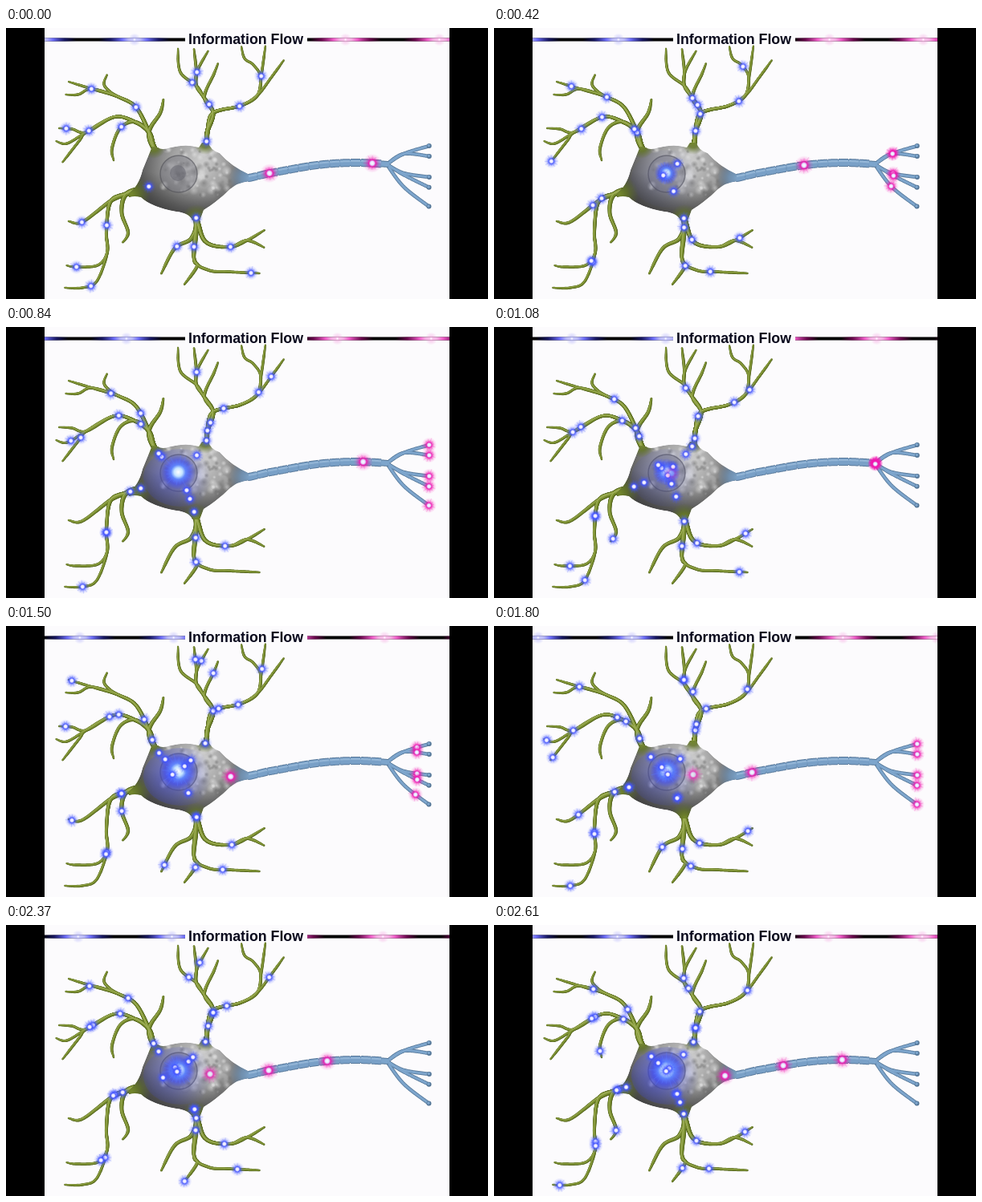
These frames come from a looping animation (600x338 px, 2.64 s). An HTML page with a canvas:

```html
<!DOCTYPE html>
<html lang="en">
<head>
<meta charset="utf-8">
<title>Information Flow</title>
<style>
  html, body { margin: 0; height: 100%; overflow: hidden; background: #000; }
  canvas { display: block; }
</style>
</head>
<body>
<canvas id="stage" width="600" height="338"></canvas>
<script>
const LOOP = 2640, STEP = 30;
const DENDRITE_SPEED = 0.085, AXON_SPEED = 0.14, BAR_SPEED = 0.266; // px per ms
const NUCLEUS = [215, 182];
const BLUE = '66,84,255', PINK = '240,24,176';
const stage = document.getElementById('stage').getContext('2d');

function mix(a, b, u) {
  return [a[0] + (b[0] - a[0]) * u, a[1] + (b[1] - a[1]) * u];
}
function random(seed) {
  const v = Math.sin(seed * 127.1) * 43758.5453;
  return v - Math.floor(v);
}

// Smooth curve through flat x,y pairs, resampled at one point per pixel.
function curve(flat) {
  const p = [];
  for (let i = 0; i < flat.length; i += 2) p.push([flat[i], flat[i + 1]]);
  const out = [p[0]];
  let last = p[0];
  for (let i = 0; i < p.length - 1; i++) {
    const a = p[i - 1] || p[i], b = p[i], c = p[i + 1], d = p[i + 2] || c;
    for (let u = .01; u < 1.005; u += .01) {
      const q = [0, 1].map(k => b[k] + u / 2 * (c[k] - a[k] +
        u * (2 * a[k] - 5 * b[k] + 4 * c[k] - d[k] + u * (3 * (b[k] - c[k]) + d[k] - a[k]))));
      const gap = Math.hypot(q[0] - last[0], q[1] - last[1]);
      if (gap >= 1) out.push(last = mix(last, q, 1 / gap));
    }
  }
  return out;
}
function pointAt(path, d) {
  const i = Math.max(0, Math.min(path.length - 1, d)), k = Math.floor(i);
  return mix(path[k], path[k + 1] || path[k], i - k);
}

// Limbs run from the nucleus outwards; pulses reach it at `first`, then every `gap` ms.
const limbs = [];
function limb(root, points, first = 0, gap = 0) {
  limbs.push({ root, path: curve([...NUCLEUS, ...points]), first, gap });
}

const crown = [187,154, 178,130];
const upper = [...crown, 162,99, 140,86];
const lower = [...crown, 160,117, 135,111];
const fan = [...lower, 100,130];
limb(30, [...upper, 107,76, 78,67], 1185, 1258);
limb(30, [...upper, 107,76, 90,83, 74,83], 1900, 2400);
limb(30, [...upper, 130,80, 122,70, 126,58]);
limb(30, [...crown, 192,106, 196,89]);
limb(30, [...fan, 82,126, 66,125], 2120, 1510);
limb(30, [...fan, 76,144, 62,141], 1770, 1150);
limb(30, [...fan, 91,141, 70,168], 2780, 1345);
limb(30, [...crown, 160,117, 142,125, 132,150, 134,165], 1250, 3042);

const mast = [246,150, 251,128, 258,106];
const west = [...mast, 246,86, 237,72];
const east = [...mast, 292,97, 313,84];
limb(34, [...west, 217,55, 214,25], 1620, 2430);
limb(34, [...west, 238,54, 252,28], 1745, 825);
limb(34, [...west, 237,54, 234,26], 1210, 2190);
limb(34, [...mast, 247,86, 259,57, 264,44], 635, 2555);
limb(34, [...east, 330,62, 346,40], 1473, 1480);
limb(34, [...east, 318,58, 323,22], 2075, 1577);
limb(34, [...east, 317,61, 308,46, 297,38, 293,23], 2660, LOOP);

const shoulder = [177,198, 150,207];
const arm = [...shoulder, 130,217, 125,254, 126,280];
limb(44, [...arm, 113,316, 95,324, 73,324], 475, 965);
limb(44, [...shoulder, 130,216, 95,242, 78,241], 1600, 1650);
limb(44, [...arm, 114,296, 86,298, 75,296], 2397, 1000);
limb(44, [...shoulder, 144,230, 152,255, 145,268], 2620, 1425);

const stalk = [236,235, 234,287];
const bough = [236,235, 249,267, 279,273, 300,265];
limb(45, [...stalk, 252,302, 276,304, 316,306], 1120, 1085);
limb(45, [...bough, 322,252], 694, 760);
limb(45, [...bough, 322,274]);
limb(45, [236,235, 231,262, 210,275, 193,307], 1255, 1855);
limb(45, [...stalk, 238,297, 222,320], 1840, 1140);

const axon = curve([...NUCLEUS, 288,188, 329,181, 387,171, 435,168, 476,170]);
const terminals = [[157, 147], [157, 160], [181, 186], [183, 199], [198, 223]]
  .map(([fork, tip]) => curve([474,170, 495,fork, 527,tip]));
const firings = [-1735, -814, 1036, 1563, 2090];

function dot(g, x, y, r, color) {
  g.fillStyle = color;
  g.beginPath();
  g.arc(x, y, r, 0, 7);
  g.fill();
}
function glow(g, x, y, r, stops) {
  const grad = g.createRadialGradient(x, y, 0, x, y, r);
  stops.forEach(([at, color]) => grad.addColorStop(at, color));
  dot(g, x, y, r, grad);
}
function rays(x, y, r, count, color, seed) {
  stage.strokeStyle = color;
  stage.lineWidth = .8;
  stage.beginPath();
  for (let i = 0; i < count; i++) {
    const a = (i + random(seed)) * 2 * Math.PI / count, len = r * (.6 + .4 * random(seed + i));
    stage.moveTo(x + Math.cos(a) * r * .4, y + Math.sin(a) * r * .4);
    stage.lineTo(x + Math.cos(a) * len, y + Math.sin(a) * len);
  }
  stage.stroke();
}
function trace(g, path, color, width) {
  g.strokeStyle = color;
  g.lineWidth = width;
  g.beginPath();
  path.forEach(q => g.lineTo(...q));
  g.stroke();
}

function drawSoma(g) {
  const body = new Path2D('M153 206Q165 198 170 177Q176 162 182 148L189 149Q194 153 205 149' +
    'Q225 144 240 149L244 143L252 143Q254 152 266 156Q280 172 302 182.5L302 191Q288 193 279 201' +
    'Q260 219 246 227L241 240L232 240Q229 231 212 229Q180 223 168 211Q160 209 153 211Z');
  const shade = g.createRadialGradient(246, 166, 4, 230, 178, 70);
  shade.addColorStop(0, '#c9c9c9');
  shade.addColorStop(.45, '#a2a2a2');
  shade.addColorStop(1, '#4c4c4c');
  g.save();
  g.clip(body);
  g.fillStyle = shade;
  g.fill(body);
  for (let i = 0; i < 110; i++) {
    const x = 195 + random(i + 1) * 85, y = 150 + random(i + 200) * 60;
    const tone = random(i + 400) > .45 ? '228,228,228' : '115,115,115';
    glow(g, x, y, 2 + random(i + 600) * 5, [[0, `rgba(${tone},.6)`], [1, `rgba(${tone},0)`]]);
  }
  const dusk = g.createLinearGradient(225, 190, 215, 232);
  dusk.addColorStop(0, 'rgba(50,50,50,0)');
  dusk.addColorStop(1, 'rgba(50,50,50,.6)');
  g.fillStyle = dusk;
  g.fill(body);
  for (const [x, y, r] of [[184, 148, 15], [248, 144, 14], [156, 207, 24], [237, 239, 19]])
    glow(g, x, y, r, [[0, '#74882c'], [.4, 'rgba(100,118,40,.85)'], [1, 'rgba(95,110,50,0)']]);
  glow(g, 302, 187, 24, [[0, '#7ba1c6'], [.4, 'rgba(115,150,185,.85)'], [1, 'rgba(115,150,185,0)']]);
  g.restore();
  dot(g, ...NUCLEUS, 23, 'rgba(125,125,132,.5)');
  g.strokeStyle = 'rgba(80,80,88,.6)';
  g.lineWidth = 1.5;
  g.stroke();
  dot(g, 214, 181, 10, 'rgba(95,95,105,.5)');
}

function drawDendrites(g) {
  for (const [scale, shift, color] of [[1, 0, '#53631f'], [.72, -.2, '#788c2f'], [.28, -.7, '#9bab54']])
    for (const { root, path } of limbs)
      for (let i = root; i < path.length; i++) {
        const tip = Math.min(1, .65 + (path.length - i) / 40);
        const width = (3.3 + 4.2 * Math.exp((root - i) / 50)) * tip;
        dot(g, path[i][0] + shift, path[i][1] + shift, width * scale / 2, color);
      }
}

function drawAxon(g) {
  g.lineJoin = 'round';
  for (const [color, width] of [['#547697', 4.6], ['#7da5cc', 3]])
    for (const path of terminals) trace(g, path, color, width);
  for (const path of terminals) {
    const [x, y] = path[path.length - 1];
    dot(g, x, y, 3, '#547697');
    dot(g, x - .5, y - .5, 1.8, '#7da5cc');
  }
  const core = axon.slice(72);
  trace(g, core, '#547697', 8);
  trace(g, core, '#7da5cc', 6);
  for (let i = 86; i < 250; i += 13) {
    const sheath = axon.slice(i, i + 13);
    trace(g, sheath, '#58799b', 10);
    trace(g, sheath, '#79a0c7', 8);
    trace(g, sheath.map(([x, y]) => [x, y - 2]), '#93b5d6', 2);
  }
}

const scene = document.createElement('canvas');
scene.width = 600;
scene.height = 338;
{
  const g = scene.getContext('2d');
  g.fillStyle = '#000';
  g.fillRect(0, 0, 600, 338);
  g.fillStyle = '#fcfbfd';
  g.fillRect(48, 0, 504, 338);
  drawAxon(g);
  drawDendrites(g);
  drawSoma(g);
  g.fillStyle = '#08081c';
  g.font = 'bold 17.75px "Liberation Sans", Arial, sans-serif';
  g.textAlign = 'center';
  g.fillText('Information Flow', 298.5, 19.5);
}

function pulse([x, y], rgb, r, seed, alpha = 1) {
  stage.globalAlpha = alpha;
  glow(stage, x, y, r, [[0, '#fff'], [.2, '#e4e2ff'], [.36, `rgba(${rgb},.9)`],
    [.5, `rgba(${rgb},.5)`], [.72, `rgba(${rgb},.16)`], [1, `rgba(${rgb},0)`]]);
  rays(x, y, r, 12, `rgba(${rgb},.28)`, seed);
  stage.globalAlpha = 1;
}

function bar(x, width, rgb, base, first, t) {
  const g = stage;
  g.save();
  g.fillStyle = '#000';
  g.fillRect(x, 12.5, width, 4);
  g.beginPath();
  g.rect(x, 0, width, 30);
  g.clip();
  for (let start = first; start < t + 200; start += 439) {
    const cx = x + (t - start) * BAR_SPEED;
    const grad = g.createLinearGradient(cx - 45, 0, cx + 45, 0);
    [`rgba(${base},0)`, `rgba(${base},.8)`, `rgb(${rgb})`, '#fff', `rgb(${rgb})`, `rgba(${base},.8)`, `rgba(${base},0)`]
      .forEach((color, i) => grad.addColorStop(i / 6, color));
    g.fillStyle = grad;
    g.fillRect(cx - 45, 12.5, 90, 4);
    glow(g, cx, 14.5, 8, [[0, 'rgba(255,255,255,.6)'], [.3, `rgba(${rgb},.3)`], [1, `rgba(${rgb},0)`]]);
  }
  g.restore();
}

// The nucleus charges up until it fires, then starts again half charged.
function drawNucleus(t) {
  const last = Math.max(...firings.filter(f => f <= t));
  const charge = last < 0 ? t / 1036 : .5 + .5 * (t - last) / 527;
  if (charge < .02) return;
  const [x, y] = [214.5, 181], r = 8 + 17 * charge, haze = Math.max(0, charge - .3);
  stage.save();
  stage.beginPath();
  stage.ellipse(217, 188, 46, 36, 0, 0, 7);
  stage.clip();
  glow(stage, 205, 188, 50, [[0, `rgba(50,60,255,${haze * .8})`], [.5, `rgba(60,70,235,${haze * .5})`],
    [1, 'rgba(60,70,235,0)']]);
  stage.restore();
  glow(stage, x, y, r, [[0, '#fff'], [.24, '#c4e4ff'], [.42, 'rgba(95,135,255,.95)'],
    [.7, 'rgba(60,75,255,.5)'], [1, 'rgba(60,75,255,0)']]);
  rays(x, y, r, 20, 'rgba(90,120,255,.5)', t);
}

function drawDendritePulses(t) {
  for (const { path, first, gap } of limbs) {
    if (!gap) continue;
    const horizon = t + path.length / DENDRITE_SPEED;
    for (let arrival = first; arrival < horizon; arrival += gap)
      if (arrival >= t) pulse(pointAt(path, (arrival - t) * DENDRITE_SPEED), BLUE, 9, t + arrival);
  }
}

function drawAxonPulses(t) {
  for (const start of firings) {
    const d = (t - start) * AXON_SPEED;
    const age = t - start - axon.length / AXON_SPEED;
    if (d < 0 || age > 750) continue;
    if (age < 0) pulse(pointAt(axon, d), PINK, 12, t + start, Math.min(1, .2 + d / 60));
    else for (const path of terminals)
      pulse(pointAt(path, Math.min(1, age / 600) * path.length), PINK, 9.5, t + start);
  }
}

function frame() {
  const t = Math.floor(performance.now() % LOOP / STEP) * STEP;
  stage.drawImage(scene, 0, 0);
  bar(48, 175, '110,110,255', '28,28,120', -421, t);
  bar(375, 177, '240,90,200', '130,10,95', -618, t);
  drawNucleus(t);
  drawDendritePulses(t);
  drawAxonPulses(t);
  requestAnimationFrame(frame);
}
frame();
</script>
</body>
</html>
```
